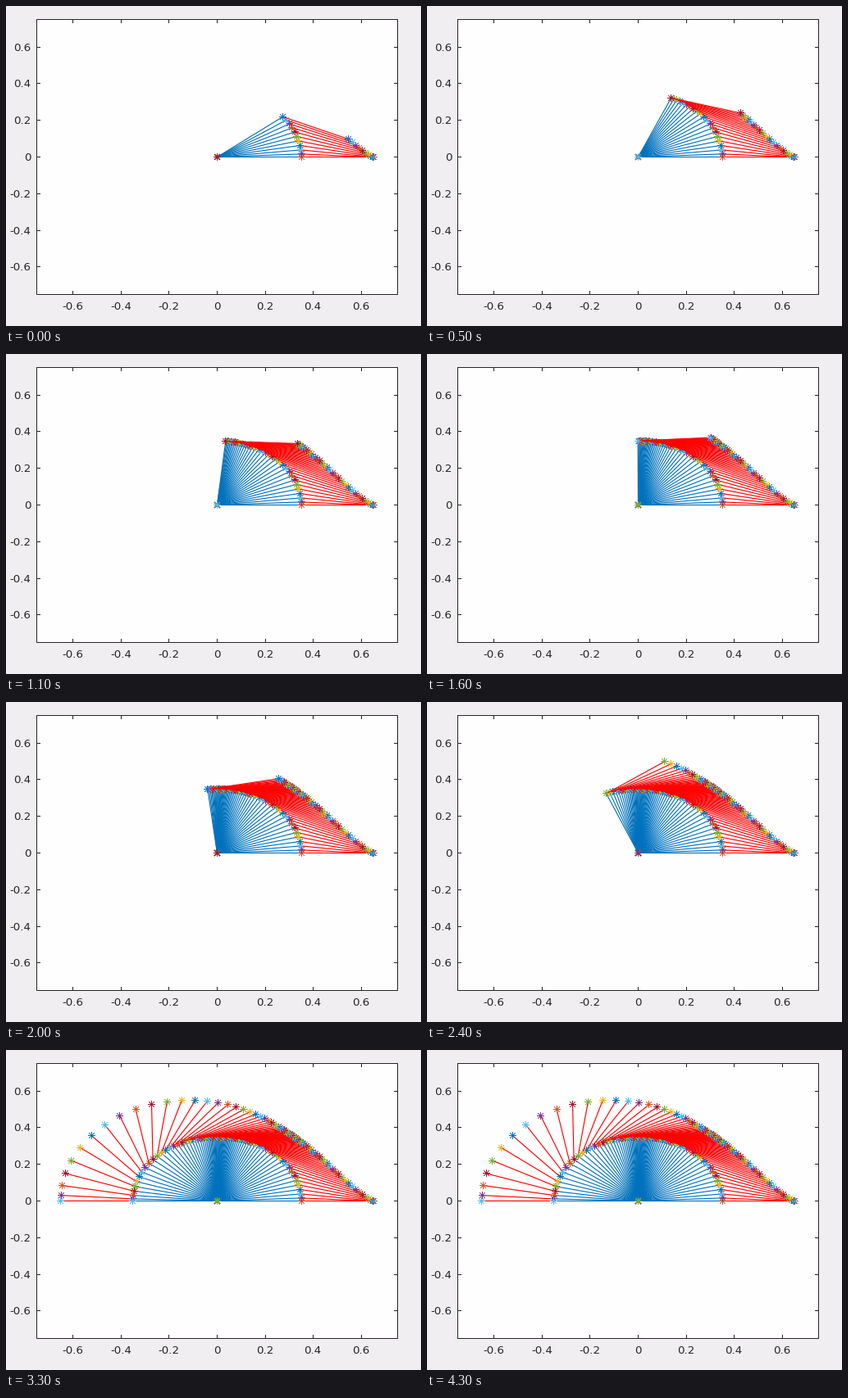
A matplotlib script that plays this animation: 506 px wide and 391 px high, repeating every 4600 ms.

```python
import numpy as np
import matplotlib.pyplot as plt
from matplotlib.animation import FuncAnimation

W, H, DPI = 506, 391, 64
FRAMES, STEP_MS = 46, 100
PX = 72 / DPI                      # one pixel in points
LEFT, RIGHT, TOP, BOTTOM = 37, 477, 16, 352
LIMIT = 0.75
L1, L2 = 0.35, 0.30                # arm link lengths
POSES = 80
INK, BLUE, RED = '#262626', '#0072BD', '#FF0000'
CYCLE = [BLUE, '#D95319', '#EDB120', '#7E2F8E', '#77AC30', '#4DBEEE', '#A2142F']

# Frame number -> newest pose; the drawing stalls for one frame near the end
PACE = (0, 5, 11, 20, 28, 29, 33), (10, 20, 34, 52, 70, 70, 79)


def decay(steps, scale, power):
    return np.exp(-(steps / scale) ** power)


def joint_angles(k):
    """Both joints settle at a middle pose, then leave it for the far side."""
    left = POSES - 1 - k
    shoulder = 90 * (1 - decay(k, 15.7, 1.27) + decay(left, 14.4, 1.45))
    elbow = -87 * (1 - decay(k, 8.2, 1.25) - decay(left, 11.3, 1.6))
    return np.radians(shoulder), np.radians(elbow)


def to_px(x, y):
    return ((LEFT + RIGHT) / 2 + x * (RIGHT - LEFT) / (2 * LIMIT),
            (TOP + BOTTOM) / 2 - y * (BOTTOM - TOP) / (2 * LIMIT))


fig = plt.figure(figsize=(W / DPI, H / DPI), dpi=DPI, facecolor='#F0EEF0')
ax = fig.add_axes([0, 0, 1, 1])
# Whole coordinates fall on pixel centres
ax.set_xlim(-0.5, W - 0.5)
ax.set_ylim(H - 0.5, -0.5)
ax.axis('off')


def line(xs, ys, color, width=1.0, z=1):
    return ax.plot(xs, ys, color=color, lw=width * PX, zorder=z, snap=False,
                   solid_capstyle='butt')[0]


def stars(xs, ys, color, z):
    px, py = [], []
    for x, y in zip(np.round(xs), np.round(ys)):
        for dx, dy in ((4.5, 0), (0, 4.5), (3.3, 3.3), (3.3, -3.3)):
            px += [x - dx, x + dx, np.nan]
            py += [y - dy, y + dy, np.nan]
    return line(px, py, color, z=z)


def draw_frame():
    ax.add_patch(plt.Rectangle((LEFT, TOP), RIGHT - LEFT, BOTTOM - TOP,
                               fc='#FFFEFF', ec='none', zorder=0))
    line([LEFT - 0.5, RIGHT, RIGHT, LEFT, LEFT], [TOP, TOP, BOTTOM, BOTTOM, TOP], INK)
    tick = 4.5
    font = dict(family='DejaVu Sans', size=13.33 * PX, color=INK, va='baseline')
    for v in np.arange(-3, 4) / 5:
        x, y = np.round(to_px(v, v))
        for edge, sign in ((TOP, 1), (BOTTOM, -1)):
            line([x, x], [edge, edge + sign * tick], INK)
        for edge, sign in ((LEFT, 1), (RIGHT, -1)):
            line([edge, edge + sign * tick], [y, y], INK)
        ax.text(x - 0.5, 370.7, f'{v:g}', ha='center', **font)
        ax.text(29.7, y + 4.7, f'{v:g}', ha='right', **font)


def draw_pose(k):
    a, b = joint_angles(k)
    ex, ey = L1 * np.cos(a), L1 * np.sin(a)
    tx, ty = ex + L2 * np.cos(a + b), ey + L2 * np.sin(a + b)
    xs, ys = to_px(np.array([0, ex, tx]), np.array([0, ey, ty]))
    z = 2 + k
    return [line(xs[:2], ys[:2], BLUE, 1.15, z),
            line(xs[1:], ys[1:], RED, 1.15, z),
            stars(xs[:1], ys[:1], CYCLE[2 * k % 7], z),
            stars(xs[1:], ys[1:], CYCLE[(2 * k + 1) % 7], z)]


draw_frame()
poses = [draw_pose(k) for k in range(POSES)]


def update(frame):
    newest = int(np.interp(frame, *PACE))
    for k, parts in enumerate(poses):
        for part in parts:
            part.set_visible(k <= newest)
    return [part for parts in poses for part in parts]


anim = FuncAnimation(fig, update, frames=FRAMES, interval=STEP_MS,
                     repeat=True, repeat_delay=0, blit=False)
plt.show()
```
